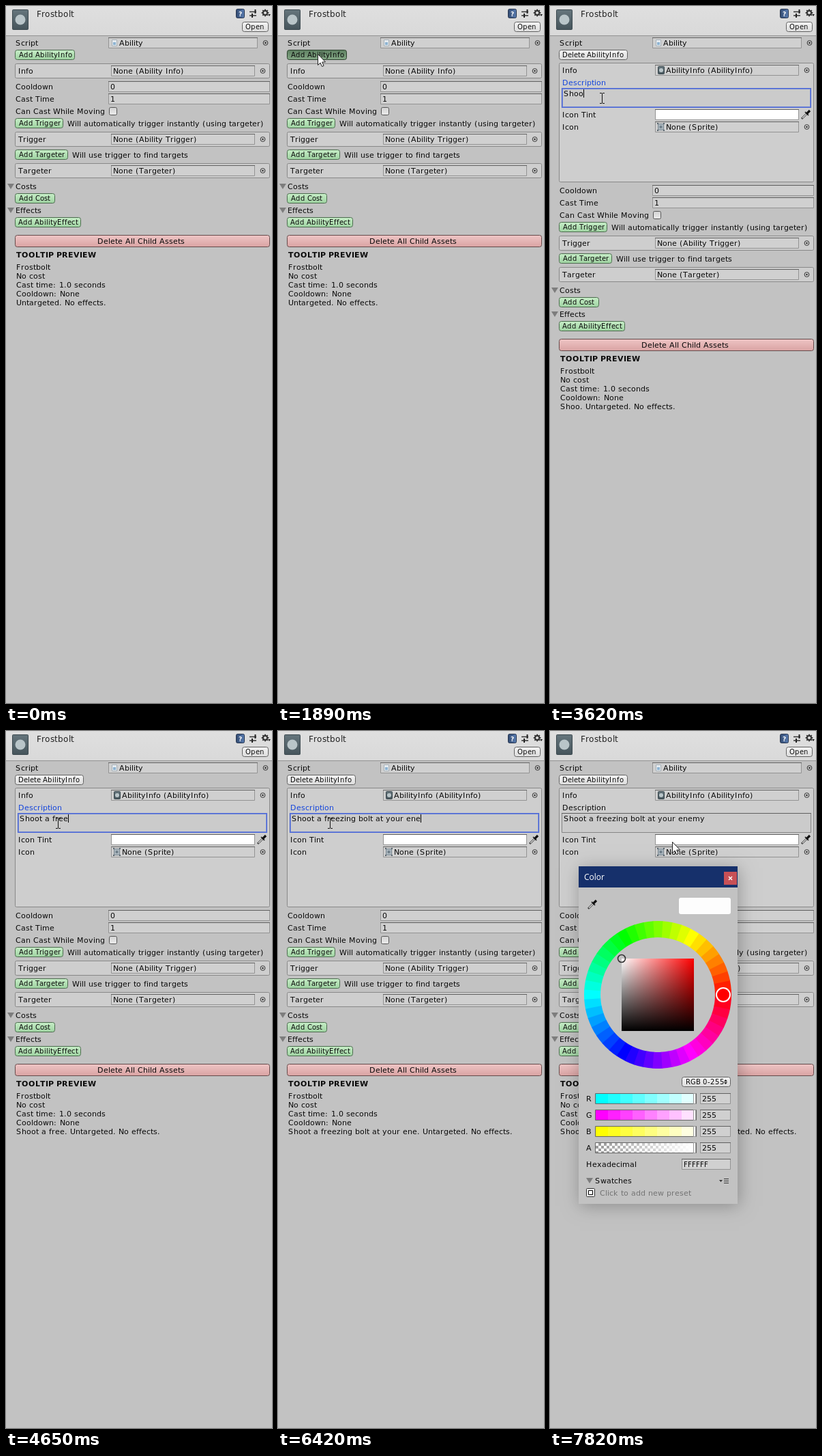
Animation, 390 px wide and 1020 px high, one loop 8000 ms. Source, as an HTML page with a canvas:

```html
<!DOCTYPE html>
<html lang="en">
<head>
<meta charset="utf-8">
<title>Ability inspector</title>
<style>
  html, body { margin: 0; width: 100%; height: 100%; overflow: hidden; background: #c2c2c2; }
  canvas { display: block; width: 390px; height: 1020px; }
</style>
</head>
<body>
<canvas id="stage" width="390" height="1020"></canvas>
<script>
const ctx = document.getElementById('stage').getContext('2d');
const FAMILY = '"DejaVu Sans", sans-serif';
const LOOP = 8000, PRESS = 1500, OPEN = 1920, FOCUS = 2700, BLUR = 7730, PICKER = 7760;

// Typing bursts: first key, last key, text
const BURSTS = [
  [3260, 3260, 'S'], [3440, 3950, 'hoot a '], [4320, 4470, 'fre'], [4650, 4770, 'ez'],
  [4920, 5070, 'ing '], [5250, 5520, 'bolt '], [5670, 6420, 'at your ene'], [6510, 6600, 'my']
];
// Pointer path: time, x, y
const PATH = [
  [560, -12, 154], [1130, 44, 64], [1440, 44, 64], [1620, 46, 65], [1770, 46, 65],
  [1890, 58, 70], [2160, 96, 107], [2310, 96, 107], [2700, 76, 135], [7220, 76, 135],
  [7490, 140, 162], [7680, 179, 162]
];

function typedAt(t) {
  let out = '';
  for (const [start, end, chars] of BURSTS) {
    if (t < start) break;
    const gap = (end - start) / Math.max(1, chars.length - 1);
    out += chars.slice(0, gap ? Math.floor((t - start) / gap + 1e-6) + 1 : 1);
  }
  return out;
}

function pointerAt(t) {
  if (t <= PATH[0][0]) return PATH[0].slice(1);
  for (let i = 1; i < PATH.length; i++) {
    const [t0, x0, y0] = PATH[i - 1], [t1, x1, y1] = PATH[i];
    if (t < t1) {
      const u = (t - t0) / (t1 - t0), e = u * u * (3 - 2 * u);
      return [Math.round(x0 + (x1 - x0) * e), Math.round(y0 + (y1 - y0) * e)];
    }
  }
  return PATH[PATH.length - 1].slice(1);
}

// Text set on whole-pixel advances, like an old hinted UI font with roomy brackets and capitals
const ROOMY = 'SI():';
const widths = {};
function advance(ch, size, bold) {
  const key = bold + ch;
  if (!(key in widths)) {
    ctx.font = `${bold} 100px ${FAMILY}`;
    widths[key] = ctx.measureText(ch).width / 100;
  }
  const extra = !bold && ROOMY.includes(ch) ? size * .08 : 0;
  return Math.round(widths[key] * size * 1.03 + extra);
}
function text(str, x, y, { size = 11, color = '#0a0a0a', bold = '' } = {}) {
  const steps = [...str].map(ch => advance(ch, size, bold));
  ctx.font = `${bold} ${size}px ${FAMILY}`;
  ctx.fillStyle = color;
  [...str].forEach((ch, i) => { ctx.fillText(ch, x, y + 4); x += steps[i]; });
  return x;
}

function rect(x, y, w, h, color) {
  ctx.fillStyle = color;
  ctx.fillRect(x, y, w, h);
}
function frame(x, y, w, h, color) {
  ctx.strokeStyle = color;
  ctx.lineWidth = 1;
  ctx.strokeRect(x + .5, y + .5, w - 1, h - 1);
}
function box(x, y, w, h, fill, stroke, r = 0) {
  ctx.beginPath();
  ctx.roundRect(x + .5, y + .5, w - 1, h - 1, r);
  ctx.fillStyle = fill;
  ctx.fill();
  ctx.strokeStyle = stroke;
  ctx.lineWidth = 1;
  ctx.stroke();
}
function circle(x, y, r, fill, stroke, width = 1) {
  ctx.beginPath();
  ctx.arc(x, y, r, 0, 7);
  if (fill) { ctx.fillStyle = fill; ctx.fill(); }
  if (stroke) { ctx.strokeStyle = stroke; ctx.lineWidth = width; ctx.stroke(); }
}
function poly(points, fill, stroke) {
  ctx.beginPath();
  points.forEach(([x, y]) => ctx.lineTo(x, y));
  ctx.closePath();
  ctx.fillStyle = fill;
  ctx.fill();
  if (stroke) { ctx.strokeStyle = stroke; ctx.lineWidth = 1; ctx.stroke(); }
}
function line(x0, y0, x1, y1, color, width = 1) {
  ctx.beginPath();
  ctx.moveTo(x0, y0);
  ctx.lineTo(x1, y1);
  ctx.strokeStyle = color;
  ctx.lineWidth = width;
  ctx.stroke();
}
function gradient(x0, y0, x1, y1, ...colors) {
  const g = ctx.createLinearGradient(x0, y0, x1, y1);
  colors.forEach((c, i) => g.addColorStop(i / (colors.length - 1), c));
  return g;
}

const SKINS = {
  green: ['#c8eec8', '#9dd2a0', '#4c6b4e'],
  pressed: ['#5d7f60', '#84a886', '#2c402d'],
  white: ['#f4f4f4', '#dcdcdc', '#626262'],
  red: ['#efc6c6', '#d9a2a2', '#654a4a']
};
function button(label, x, y, w, h, skin, tx = x + 6, size = 10) {
  const [top, bottom, edge] = SKINS[skin];
  box(x, y, w, h, gradient(0, y, 0, y + h, top, bottom), edge, 3);
  text(label, tx, y + Math.floor(h / 2), { size });
}
function field(x, y, w, value = '', tx = x + 3, size = 11, fill = '#d0d0d0') {
  box(x, y, w, 16, fill, '#939393');
  rect(x, y, w, 1, '#606060');
  text(value, tx, y + 8, { size });
}
function target(x, y) {
  circle(x, y, 3.4, null, '#333');
  circle(x, y, 1.2, '#222');
}
function objectRow(label, value, y, tx) {
  text(label, 18, y);
  field(154, y - 8, 211, value, tx);
  target(376.5, y);
}
function group(y, h) {
  box(13, y, 374, h, '#cecece', '#888', 2);
}
function foldout(x, y) {
  poly([[x, y - 4], [x + 10, y - 4], [x + 5, y + 4]], '#7d7d7d');
}
function tile(x, y, w, h, r) {
  box(x, y, w, h, gradient(0, y, 0, y + h, '#66767d', '#45545b'), '#3b484e', 1);
  circle(x + w / 2, y + h / 2, r, '#b9c5c9');
}
function dropper(x, y) {
  line(x - 6, y + 6, x + 2, y - 2, '#333', 2.6);
  line(x - 5, y + 5, x + 1, y - 1, '#e4e4e4', 1.2);
  line(x - 1, y - 4, x + 4, y + 1, '#111', 1.6);
  line(x + 1, y - 1, x + 6, y - 6, '#111', 3.2);
}

function header() {
  rect(0, 0, 390, 43, gradient(0, 0, 0, 43, '#dfdfdf', '#d9d9d9'));
  rect(0, 43, 390, 1, '#939393');
  tile(9, 5, 24, 30, 7.5);
  text('Frostbolt', 45, 12, { size: 12, color: '#222' });
  box(337, 4, 13, 14, gradient(337, 0, 350, 0, '#31496f', '#5b7fb5'), '#26354f', 2);
  text('?', 341, 11, { size: 9, color: '#fff', bold: 'bold' });
  line(357, 8.5, 367, 8.5, '#333', 1.5);
  line(357, 14, 367, 14, '#333', 1.5);
  line(365.5, 5, 365.5, 11, '#222', 2);
  line(361, 11, 361, 17, '#222', 2);
  for (let a = 0; a < 8; a++) {
    const c = Math.cos(a * Math.PI / 4), s = Math.sin(a * Math.PI / 4);
    line(380 + 2 * c, 10 + 2 * s, 380 + 5.3 * c, 10 + 5.3 * s, '#333', 2);
  }
  circle(380, 10, 3, '#dcdcdc', '#333', 1.8);
  poly([[384, 12], [388, 12], [386, 15]], '#222');
  button('Open', 346, 23, 39, 15, 'white', 351);
}

function infoPanel(typed, focused) {
  group(83, 175);
  objectRow('Info', 'AbilityInfo (AbilityInfo)', 94, 170);
  tile(158, 88, 10, 12, 3);
  text('Description', 18, 112, focused ? { color: '#1546dc' } : {});
  box(17, 120, 366, 29, '#cbcbcb', '#858585');
  rect(17, 120, 366, 1, '#606060');
  if (focused) {
    frame(17, 120, 366, 29, '#4a66d8');
    frame(18, 121, 364, 27, '#7186d4');
  }
  const end = text(typed, 20, 128);
  if (focused) rect(end, 122, 1, 12, '#000');
  text('Icon Tint', 18, 159);
  field(154, 151, 211, '', 157, 11, '#fff');
  dropper(375, 159);
  objectRow('Icon', 'None (Sprite)', 177, 170);
  box(158, 172, 9, 10, '#a9b5bd', '#7c8992');
  for (const [x, y] of [[157, 171], [166, 171], [157, 181], [166, 181]]) rect(x, y, 2, 2, '#56636c');
  circle(162.5, 177, 2, '#6d7c87');
}

function settings(typed) {
  text('Cooldown', 14, 118);
  field(150, 110, 237, '0');
  text('Cast Time', 14, 136);
  field(150, 128, 237, '1');
  text('Can Cast While Moving', 14, 154);
  box(151, 148, 12, 12, gradient(0, 148, 0, 160, '#d2d2d2', '#ececec'), '#555', 2);
  button('Add Trigger', 13, 164, 71, 15, 'green');
  text('Will automatically trigger instantly (using targeter)', 90, 172);
  group(184, 22);
  objectRow('Trigger', 'None (Ability Trigger)', 195);
  button('Add Targeter', 13, 210, 78, 15, 'green');
  text('Will use trigger to find targets', 97, 218);
  group(230, 22);
  objectRow('Targeter', 'None (Targeter)', 241);
  foldout(2, 264);
  text('Costs', 14, 264);
  button('Add Cost', 13, 274, 59, 15, 'green');
  foldout(2, 299);
  text('Effects', 14, 299);
  button('Add AbilityEffect', 13, 309, 97, 15, 'green', 18);
  button('Delete All Child Assets', 13, 335, 374, 18, 'red', 134, 11);
  text('TOOLTIP PREVIEW', 15, 364, { bold: 'bold' });
  ['Frostbolt', 'No cost', 'Cast time: 1.0 seconds', 'Cooldown: None',
    (typed && typed + '. ') + 'Untargeted. No effects.'
  ].forEach((row, i) => text(row, 15, 382 + 13 * i));
}

function wheel(x, y) {
  const parts = 48, step = 2 * Math.PI / parts;
  for (let i = 0; i < parts; i++) {
    ctx.beginPath();
    ctx.arc(x, y, 96, -(i + .5) * step - .004, -(i - .5) * step + .004);
    ctx.strokeStyle = `hsl(${i * 360 / parts} 100% 50%)`;
    ctx.lineWidth = 24;
    ctx.stroke();
  }
  rect(105, 333, 106, 106, gradient(105, 0, 211, 0, '#fff', '#f00'));
  rect(105, 333, 106, 106, gradient(0, 333, 0, 439, 'rgba(0,0,0,0)', '#000'));
  circle(105, 333, 5.5, null, '#333', 1.6);
  circle(254, 386, 10, '#f00', '#fff', 2);
}

function channel(name, y, hue) {
  text(name, 53, y);
  box(66, y - 8, 149, 16, '#fff', '#666');
  if (hue === undefined) {
    for (let i = 0; i < 36; i++)
      for (let j = 0; j < 4; j++)
        if ((i + j) % 2) rect(67 + 4 * i, y - 7 + 4 * j, 4, j < 3 ? 4 : 2, `rgba(120,120,120,${.75 * (1 - i / 35)})`);
  } else {
    for (let i = 0; i < 8; i++) rect(67 + 18 * i, y - 7, 18, 14, `hsl(${hue} 100% ${50 + i * 6.3}%)`);
  }
  box(210, y - 8, 4, 16, '#fff', '#999');
  field(220, y - 8, 45, '255');
}

function picker() {
  ctx.save();
  ctx.shadowColor = 'rgba(0,0,0,.28)';
  ctx.shadowBlur = 24;
  ctx.shadowOffsetX = 2;
  ctx.shadowOffsetY = 3;
  rect(42, 198, 233, 494, '#c2c2c2');
  ctx.restore();
  rect(42, 198, 233, 31, '#16306b');
  ctx.font = '12px "Open Sans", sans-serif';
  ctx.fillStyle = '#fff';
  ctx.fillText('Color', 50, 218);
  rect(255, 206, 19, 19, '#c75056');
  line(262, 213, 267, 218, '#fff', 1.4);
  line(267, 213, 262, 218, '#fff', 1.4);
  dropper(62, 254);
  ctx.beginPath();
  ctx.roundRect(189, 244, 76, 24, 3);
  ctx.fillStyle = '#fdfdfd';
  ctx.fill();
  wheel(158, 386);
  button('', 193, 506, 72, 15, 'white');
  ctx.save();
  ctx.beginPath();
  ctx.rect(193, 506, 62, 15);
  ctx.clip();
  text('RGB 0-255', 199, 513, { size: 10 });
  ctx.restore();
  poly([[255, 513], [260, 513], [257.5, 510]], '#222');
  poly([[255, 514], [260, 514], [257.5, 517]], '#222');
  channel('R', 538, 180);
  channel('G', 562, 300);
  channel('B', 586, 60);
  channel('A', 610);
  text('Hexadecimal', 53, 634);
  field(193, 626, 72, 'FFFFFF', 196, 10);
  foldout(53, 658);
  text('Swatches', 66, 658);
  poly([[248, 657], [253, 657], [250.5, 660]], '#333');
  for (const y of [655, 658, 661]) rect(255, y, 7, 1, '#333');
  box(53, 669, 13, 13, '#eee', '#333', 1);
  box(56, 672, 7, 7, '#fff', '#000');
  text('Click to add new preset', 73, 676, { color: '#747474' });
}

function pointer(x, y, beam) {
  if (beam) {
    line(x + .5, y - 7, x + .5, y + 7, '#111');
    for (const dy of [-7.5, 7.5]) {
      line(x - 3, y + dy, x, y + dy, '#111');
      line(x + 1, y + dy, x + 4, y + dy, '#111');
    }
    return;
  }
  const arrow = [[0, 0], [0, 16], [3.6, 12.6], [6, 18], [8.6, 17], [6.2, 11.6], [11, 11.4]];
  poly(arrow.map(([dx, dy]) => [x + dx + .5, y + dy + .5]), '#fff', '#222');
}

function draw(t) {
  const open = t >= OPEN, focused = t >= FOCUS && t < BLUR, typed = typedAt(t);
  rect(0, 0, 390, 1020, '#c2c2c2');
  header();
  text('Script', 14, 54);
  field(150, 46, 219, 'Ability', 166);
  box(155, 49, 8, 10, '#e6ebef', '#a5afb6');
  rect(157, 53, 4, 4, '#8fb4d2');
  target(380.5, 54);
  if (open) {
    button('Delete AbilityInfo', 13, 64, 101, 15, 'white', 18);
    infoPanel(typed, focused);
  } else {
    button('Add AbilityInfo', 13, 64, 88, 15, t >= PRESS ? 'pressed' : 'green');
    group(84, 22);
    objectRow('Info', 'None (Ability Info)', 95);
  }
  ctx.save();
  if (open) ctx.translate(0, 152);
  settings(typed);
  ctx.restore();
  if (t >= PICKER) {
    ctx.globalAlpha = Math.min(1, (t - PICKER + 15) / 60);
    picker();
    ctx.globalAlpha = 1;
  }
  const [x, y] = pointerAt(t);
  pointer(x, y, open && y > 120 && y < 149);
}

const begin = performance.now();
function tick() {
  draw((performance.now() - begin) % LOOP);
  requestAnimationFrame(tick);
}
tick();
</script>
</body>
</html>
```
